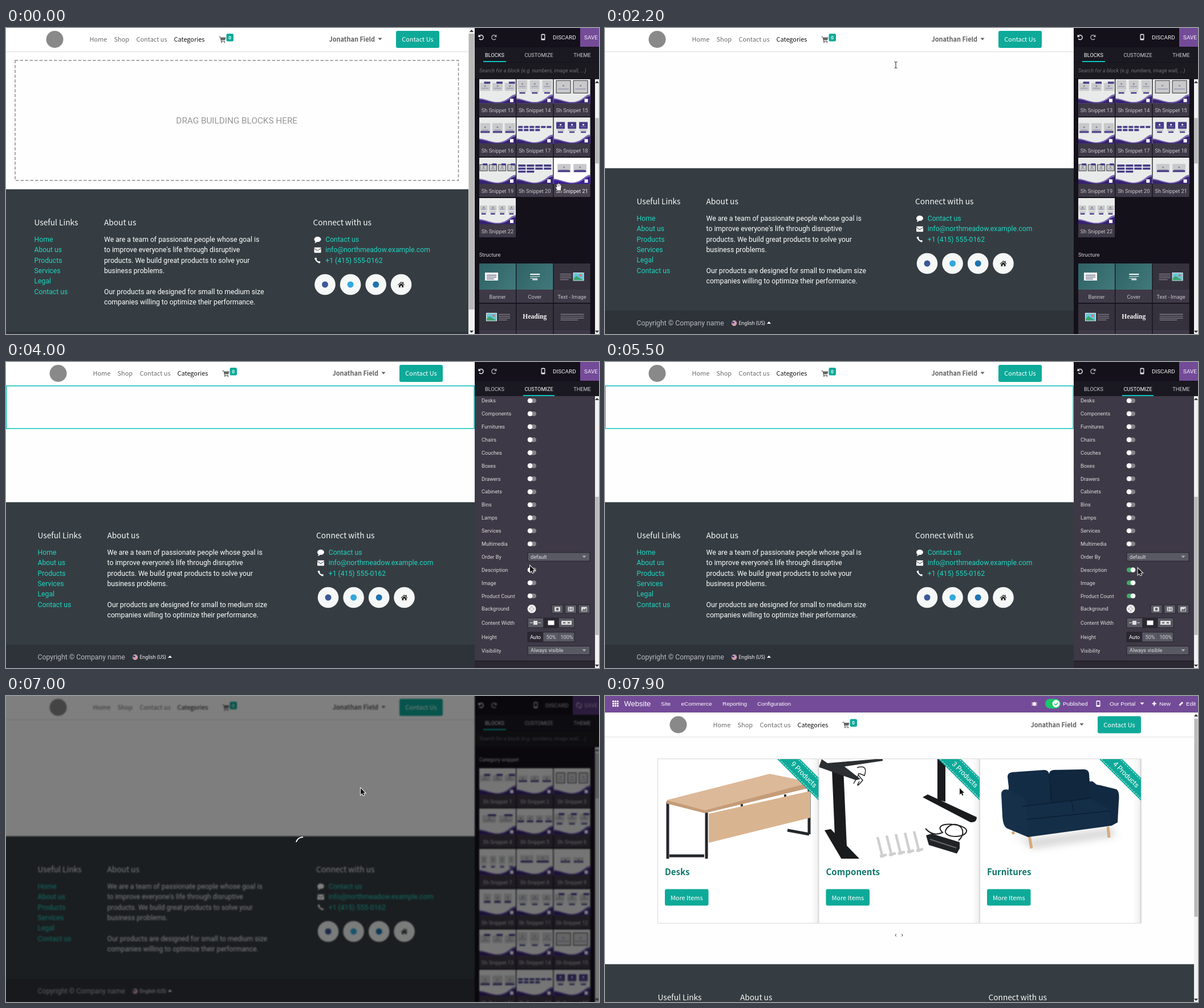
An HTML page with a canvas that plays this animation: 1040x538 px, repeating every 8000 ms.

```html
<!DOCTYPE html>
<html lang="en">
<head>
<meta charset="utf-8">
<title>Website builder</title>
<style>
html, body { margin: 0; width: 100%; height: 100%; overflow: hidden; background: #fefefe; }
canvas { display: block; }
</style>
</head>
<body>
<canvas width="1040" height="538"></canvas>
<script>
const canvas = document.querySelector('canvas'), g = canvas.getContext('2d');
const ROBOTO = 'Roboto, sans-serif';
const SOURCE = '"Noto Sans CJK JP", "Noto Sans CJK SC", "Noto Sans CJK", sans-serif';
const ARIAL = '"Liberation Sans", sans-serif';
const TEAL = '#0eaa99', LINK = '#1fd5c1', ACCENT = '#0bc4be', PURPLE = '#744b98', INK = '#453b87';
const PANEL = '#3e3946', DARK = '#14111b', LOOP = 8000;

function text(s, x, y, color, size = 12.235, font = ROBOTO, align = 'left', style = '') {
  g.font = `${style} ${size}px ${font}`;
  g.textAlign = align;
  g.fillStyle = color;
  g.fillText(s, x, y);
}
function box(x, y, w, h, color, r = 0) {
  g.fillStyle = color;
  g.beginPath();
  g.roundRect(x, y, w, h, r);
  g.fill();
}
function frame(x, y, w, h, color, lw = 1) {
  g.strokeStyle = color;
  g.lineWidth = lw;
  g.strokeRect(x, y, w, h);
}
function disc(x, y, r, color) { box(x - r, y - r, 2 * r, 2 * r, color, r); }
function fill(d, color) { g.fillStyle = color; g.fill(new Path2D(d)); }
function line(d, color, w = 1) { g.strokeStyle = color; g.lineWidth = w; g.stroke(new Path2D(d)); }
function at(x, y, draw, angle = 0) {
  g.save();
  g.translate(x, y);
  g.rotate(angle);
  draw();
  g.restore();
}
function clip(x, y, w, h, draw) {
  g.save();
  g.beginPath();
  g.rect(x, y, w, h);
  g.clip();
  draw();
  g.restore();
}
function blurred(radius, draw) {
  g.filter = `blur(${radius}px)`;
  draw();
  g.filter = 'none';
}
function caret(x, y, color, up = false) {
  at(x, y, () => fill(up ? 'M-3.5 2H3.5L0-2Z' : 'M-3.5-2H3.5L0 2Z', color));
}
function scrollbar(x, y, w, h, top, size) {
  box(x, y, w, h, '#f1f1f1');
  box(x + .5, top, w - 1, size, '#b9b9b9');
  caret(x + w / 2, y + 5, '#333', true);
  caret(x + w / 2, y + h - 4, '#333');
}
function mobile(x, y, color, screen) {
  box(x - 3.5, y - 5.5, 7, 11, color, 1.5);
  box(x - 2.2, y - 3.7, 4.4, 6.3, screen);
}

// ---- website page ----
function header({w, hx, rx}) {
  box(0, 0, w, 41, '#fff');
  box(0, 41, w, 1, '#e2e2e2');
  box(0, 42, w, 1, '#f5f5f5');
  disc(hx + 36, 20, 15, '#8a8989');
  [['Home', 97], ['Shop', 140], ['Contact us', 179]].forEach(([s, x]) =>
    text(s, hx + x, 24, '#6c6c6c', 10.95, SOURCE));
  text('Categories', hx + 245, 24, '#151515', 10.95, SOURCE);
  at(hx + 324, 15, () => {
    fill('M0 0H2.6L3 1.5H12L10.6 6.5H4.2L4.5 8H10.5V9H3.6L2 1.2H0Z', '#666');
    disc(4.6, 10, 1.1, '#666');
    disc(9.8, 10, 1.1, '#666');
  });
  box(hx + 337, 10, 12.5, 13.5, TEAL, 2.5);
  text('0', hx + 343.2, 19.8, '#fff', 8, SOURCE, 'center', 'bold');
  text('Jonathan Field', rx - 113, 24, '#606060', 10.95, SOURCE, 'right', 'bold');
  caret(rx - 104, 19.5, '#606060');
  box(rx - 76, 5, 76, 30, TEAL, 3);
  text('Contact Us', rx - 38, 24, '#fff', 10.95, SOURCE, 'center');
}

const NARROW = ['We are a team of passionate people whose goal is', "to improve everyone's life through disruptive",
  'products. We build great products to solve your', 'business problems.'];
const WIDE = ['We are a team of passionate people whose goal is to improve',
  "everyone's life through disruptive products. We build great", 'products to solve your business problems.'];
const CLOSING = ['', 'Our products are designed for small to medium size', 'companies willing to optimize their performance.'];

function footer({w, fy, cols: [a, b, c], wide}) {
  const list = (items, x, color) => items.forEach((s, i) => text(s, x, fy + 92 + i * 18.35, color));
  const bar = fy + (wide ? 232 : 250);
  box(0, fy - .5, w, 538, '#353d42');
  text('Useful Links', a, fy + 63, '#f8f8f8', 13.7, SOURCE);
  text('About us', b, fy + 63, '#f8f8f8', 13.7, SOURCE);
  text('Connect with us', c, fy + 63, '#f8f8f8', 13.7, SOURCE);
  list(['Home', 'About us', 'Products', 'Services', 'Legal', 'Contact us'], a, LINK);
  list([...(wide ? WIDE : NARROW), ...CLOSING], b, '#fff');
  list(['Contact us', 'info@northmeadow.example.com', '+1 (415) 555-0162'], c + 21.7, LINK);
  at(c + 8, fy + 88, () => {
    fill('M-6-.5A6 4.6 0 1 1 -1 4Q-3 6-5.5 6Q-4 4.5-4 3Q-6 2-6-.5Z', '#fff');
    box(-6, 13.7, 12, 9.5, '#fff', 1);
    line('M-6 15.5L0 19.5L6 15.5', '#353d42');
    line('M-3.5 32.5Q-3 39 3.8 40.5', '#fff', 2.3);
    line('M-4 32.2L-2.8 35M1.4 39.3L4.5 40.3', '#fff', 3.3);
  });
  ['#3b5998', '#33a8de', '#1d74b0'].forEach((color, i) => {
    disc(c + 21 + i * 44.6, fy + 167, 18.3, '#f6f8f8');
    disc(c + 21 + i * 44.6, fy + 167, 5.5, color);
  });
  disc(c + 154.5, fy + 167, 18.3, '#f6f8f8');
  at(c + 154.5, fy + 167, () => {
    fill('M-6 .5L0-5L2.5-2.7V-4.5H4V-1.3L6 .5L5.3 1.3L0-3.5L-5.3 1.3Z', '#222');
    fill('M-4 1.3L0-2.3L4 1.3V5H1.2V2H-1.2V5H-4Z', '#222');
  });
  box(0, bar, w, 60, '#2e333a');
  text('Copyright © Company name', a, bar + 26, '#b9bbbe');
  at(a + 171, bar + 22, () => {
    disc(0, 0, 4.6, '#eee');
    for (let y = -3; y < 4; y += 2.4) box(-4.2, y, 8.4, 1.1, '#c8324a');
    box(-4, -3, 4, 3.5, '#394a8c');
  });
  text('English (US)', a + 179, bar + 25, '#fff', 8.3, '"Noto Sans", sans-serif');
  caret(a + 232, bar + 21, '#fff', true);
}

function page(p) {
  box(0, 0, p.w, 538, '#fefefe');
  footer(p);
  at(0, p.top || 0, () => header(p));
}

const HINT = {w: 811, hx: 49.5, rx: 760, fy: 284, cols: [49.5, 172, 538.5]};
const EDIT = {w: 822, hx: 55.5, rx: 766, fy: 247, cols: [55.5, 177.5, 544]};
const SLIDE = {w: 1001, hx: 145.5, rx: 855.5, fy: 265, cols: [76.5, 221.5, 657], wide: true};
const VIEW = {w: 1033, hx: 92.5, rx: 940, fy: 265, cols: [92.5, 237, 672.5], wide: true};

function dropZone() {
  g.setLineDash([5.5, 3]);
  frame(16, 57, 777.5, 211, '#8d8d8d', 1.5);
  g.setLineDash([]);
  text('DRAG BUILDING BLOCKS HERE', 404.7, 168, '#969696', 15.3, ROBOTO, 'center');
  scrollbar(811, 0, 11, 538, 10, 485);
}
function blockTools() {
  box(390, 21, 42, 21, DARK, 2);
  line('M397 28V35M394 31.5H400M408 28H414V35H408Z', '#ddd');
  box(422, 28, 6, 8, '#e6586c', 1);
}

// ---- editor sidebar ----
// [count, width, top, height, style]: c caption, o outline, p purple, b band, t chip
const MINI = [
  [3, 18, 12, 11, 't'], [3, 16, 13, 12, 'b'], [3, 15, 8, 18, 'o'], [2, 24, 12, 13, 't'],
  [4, 13, 12, 13, 'b'], [3, 17, 10, 11, 'ct'], [4, 11, 12, 14, 'c'], [2, 23, 11, 14, 'b'],
  [2, 18, 15, 10, 'b'], [3, 13, 8, 17, 'b'], [3, 16, 9, 12, 'c'], [3, 17, 9, 12, 'ct'],
  [3, 18, 10, 14, 't'], [3, 17, 5, 17, 'c'], [2, 25, 6, 22, 'o'], [3, 18, 10, 18, 'b'],
  [6, 4], [3, 15, 8, 12, 'pc'], [4, 13, 12, 11, 'ot'], [4, 4, 2], [2, 23, 11, 15, 'b'], [4, 13, 13, 9, 'c']];

function mini([n, w, top, h, style]) {
  if (!style) {
    const rows = [n, w, top || 0], step = 60 / n;
    rows.forEach((k, r) => {
      for (let i = 0; i < k; i++) box(3 + i * step, (n > 5 ? 15 : 12) + r * 5.3, step - 2, 3.6, INK, .5);
    });
    return;
  }
  const step = Math.min(63 / n + w * .04, w + 5), has = s => style.includes(s);
  for (let i = 0; i < n; i++) {
    const x = 32 + (i - (n - 1) / 2) * step - w / 2;
    box(x, top, w, h, has('p') ? INK : '#c9c9cb', 1);
    if (has('o')) frame(x, top, w, h, '#333', 1);
    if (has('b')) box(x + 1, top + h - 4, w - 2, 3, INK);
    if (has('t')) box(x + w * .4, top - 2, w * .6, 3.5, INK);
    if (has('c')) {
      box(x + 1, top + h + 2, w - 2, 1, '#999');
      box(x + w * .2, top + h + 4.5, w * .6, 2.5, INK);
    }
    disc(x + w / 2, top + h * .4, 1.5, has('p') ? '#fff' : '#8b8994');
    box(x + 3, top + h * .65, w - 6, 1, '#8580a5');
  }
}
function thumb(i, hover) {
  box(0, 0, 64, 46, hover ? '#fff' : '#e9ebea');
  fill('M0 37C14 38 24 46 38 43S54 31 64 30V46H0Z', '#7b69b0');
  fill('M0 39C12 40 22 46 36 45S54 35 64 33V46H0Z', hover ? '#3c1f96' : '#37236f');
  box(54, 38, 6, 6, '#fff');
  mini(MINI[i - 1]);
}
function label(s, hover) {
  box(0, 46, 64, 23, hover ? '#48434f' : PANEL);
  text(s, 32, 62, hover ? '#eee' : '#c8c6ca', 9.18, ROBOTO, 'center');
}
function lines(x, y, n, w, color = '#8a8690') {
  for (let i = 0; i < n; i++) box(x, y + i * 3.3, i === n - 1 ? w * .75 : w, 1.2, color);
}
function picture(x) {
  box(x, 16, 19, 14.5, '#e8f3f5');
  box(x + 1, 17, 17, 12.5, '#68c5d8');
  disc(x + 13, 21, 2, '#f4685b');
  fill(`M${x + 1} 29.5V26L${x + 6} 22L${x + 18} 29.5Z`, '#3ea36f');
}
const STRUCTURE = [
  ['Banner', () => { box(10, 16, 23, 14, '#f4f5f5'); lines(13, 20, 3, 17, '#557'); }],
  ['Cover', () => { box(24, 18, 17, 2, '#fff'); lines(24, 22, 2, 17, '#cfdcdc'); box(28, 27, 9, 2.5, '#dde'); }],
  ['Text - Image', () => { lines(11, 18, 4, 20); picture(34); }],
  ['', () => { picture(12); lines(34, 18, 4, 20); }],
  ['', () => text('Heading', 32, 26, '#f4f4f4', 11.6, '"Liberation Serif", serif', 'center', 'bold')],
  ['', () => lines(12, 18, 4, 41)]];

function blocks(scroll, hover) {
  box(822, 61, 218, 28, '#1c1a21');
  text('Search for a block (e.g. numbers, image wall, ...)', 830, 78, '#716d78', 9.1, ROBOTO, 'left', 'italic');
  clip(822, 90, 211, 448, () => at(0, -scroll, () => {
    const cell = (k, top, draw) => at(830 + k % 3 * 65.3, top + Math.floor(k / 3) * 70.85, draw);
    text('Category snippet', 830, 115, '#d5d3d8', 9.18);
    for (let i = 1; i <= 22; i++) cell(i - 1, 127, () => {
      thumb(i, i === hover);
      label('Sh Snippet ' + i, i === hover);
    });
    text('Structure', 830, 726, '#d5d3d8', 9.18);
    STRUCTURE.forEach(([name, draw], k) => cell(k, 738, () => {
      const shade = g.createLinearGradient(0, 0, 64, 46);
      shade.addColorStop(0, '#2f6265');
      shade.addColorStop(1, '#41797a');
      box(0, 0, 64, 46, k < 2 ? shade : '#36323d');
      label(name);
      draw();
    }));
  }));
  scrollbar(1033, 90, 7, 448, 100 + scroll * .18, 80);
}

const OPTIONS = ['Desks', 'Components', 'Furnitures', 'Chairs', 'Couches', 'Boxes', 'Drawers', 'Cabinets', 'Bins',
  'Lamps', 'Services', 'Multimedia', 'Order By', 'Description', 'Image', 'Product Count'];

function toggle(y, on) {
  box(915, y - 4, 15, 8, on ? '#40ad67' : '#85838a', 4);
  disc(on ? 926 : 919, y, 4.3, '#fff');
}
function select(s, y) {
  box(915, y - 7.5, 109, 15, '#595964', 1.5);
  frame(915, y - 7.5, 109, 15, '#25222b');
  text(s, 920, y + 3.3, '#d9d9d9', 9.18);
  caret(1014, y, '#aaa');
}
function group(y, active, names) {
  names.forEach((s, i) => {
    box(915 + i * 27.5, y - 8.5, 27, 17, i === active ? '#2b2831' : '#595964');
    text(s, 928.5 + i * 27.5, y + 3.3, i === active ? '#fff' : '#d0d0d4', 9.18, ROBOTO, 'center');
  });
  frame(915, y - 8.5, 82, 17, '#25222b');
}
function customize(t) {
  const shift = t < 3200 ? 328 : 0, on = {Description: 4300, Image: 4900, 'Product Count': 5300};
  box(822, 60, 218, 478, PANEL);
  clip(822, 60, 211, 478, () => at(0, shift, () => {
    box(822, -268, 211, 24, '#2b2833');
    text('Block', 830, -252, '#fff', 9.95);
    OPTIONS.forEach((s, i) => {
      const y = 68 + i * 22.88;
      text(s, 834, y + 3.3, '#d9d9d9', 9.18);
      if (s === 'Order By') select('default', y);
      else toggle(y, t >= on[s]);
    });
    ['Background', 'Content Width', 'Height', 'Visibility'].forEach((s, i) =>
      text(s, 834, [437.3, 461.5, 486.7, 510.5][i], '#d9d9d9', 9.18));
    disc(922, 434, 7.5, '#f2f2f2');
    for (let i = 0; i < 9; i++) if (i % 2) box(917 + i % 3 * 3.3, 429 + Math.floor(i / 3) * 3.3, 3.3, 3.3, '#c9c9c9');
    for (let i = 0; i < 3; i++) {
      box(957 + i * 23.5, 427, 20, 15, '#595964', 1);
      frame(957 + i * 23.5, 427, 20, 15, '#25222b');
      box(962 + i * 23.5, 430.5, 10, 8, '#d9d9d9', 1);
    }
    disc(967, 434.5, 2.3, '#595964');
    line('M988 431V438M993 431V438M988 434.5H993', '#595964');
    fill('M1010 437.5L1013 434L1015 435.5L1018 432V437.5Z', '#595964');
    group(458.5, 1, ['', '', '']);
    box(925, 455, 7, 7, '#ddd');
    line('M919 458.5H924M933 458.5H938', '#ddd');
    box(950.5, 454.5, 11, 8, '#fff');
    box(974, 455, 18, 7, '#ddd');
    line('M977 458.5H981M985 458.5H989', '#595964', 2);
    group(483.5, 0, ['Auto', '50%', '100%']);
    select('Always visible', 507);
    box(822, 526, 211, 12, '#2b2833');
    box(822, 525, 211, 1, '#1a181f');
  }));
  scrollbar(1033, 60, 7, 478, shift ? 70 : 237, 243);
}

function sidebar(t, hover) {
  const custom = t >= 2500 && t < 6400, saving = t >= 6300, back = saving ? 13 : 0;
  box(822, 0, 218, 538, DARK);
  box(822, 34, 218, 26, '#1a1820');
  [833, 856].forEach((x, i) => at(x, 16.5, () => {
    if (i) g.scale(-1, 1);
    line('M-3-2.5A4 4 0 1 1 -3 2.5', i ? '#aaa' : '#eee', 1.4);
    fill('M-4.5-5V-.5H0Z', i ? '#aaa' : '#eee');
  }));
  mobile(942 - back, 16, saving ? '#b5b4b8' : '#e6e6e6', DARK);
  text('DISCARD', 959 - back, 20, saving ? '#c4c3c6' : '#f2f2f2', 9.95);
  box(1007 - back, 0, 60, 33, saving ? '#57397a' : PURPLE);
  text('SAVE', 1014, 20, saving ? '#b9a9cb' : '#f5f0fa', 9.95);
  if (saving) at(1005, 16.5, () => {
    line('M-4-1A4 4 0 0 1 3-3M4 1A4 4 0 0 1 -3 3', '#b9a9cb', 1.4);
    fill('M4.5-5V-1H.5ZM-4.5 5V1H-.5Z', '#b9a9cb');
  }, (t - 6400) / 1000 * Math.PI);
  [['BLOCKS', 857], ['CUSTOMIZE', 934.5], ['THEME', 1010.5]].forEach(([s, x], i) =>
    text(s, x, 50.5, i === +custom ? '#fff' : '#cfcdd2', 9.18, ROBOTO, 'center'));
  if (custom) box(907, 58, 55, 2, ACCENT); else box(837, 58, 40, 2, ACCENT);
  if (custom) customize(t);
  else blocks(t < 6700 ? 324 : 0, hover);
}

// ---- published view ----
function navbar() {
  box(0, 0, 1040, 29, PURPLE);
  for (let i = 0; i < 9; i++) box(13 + i % 3 * 3.9, 8 + Math.floor(i / 3) * 3.9, 2.9, 2.9, '#fff');
  text('Website', 33.5, 18, '#fff', 13, ARIAL);
  [['Site', 98], ['eCommerce', 133.5], ['Reporting', 206], ['Configuration', 267], ['Published', 803],
    ['Our Portal', 885], ['New', 972], ['Edit', 1019]].forEach(([s, x]) => text(s, x, 17, '#fff', 9.95, ARIAL));
  box(750.5, 10.5, 5, 7, '#fff', 2.5);
  line('M748.5 11L757.5 17M748.5 17L757.5 11M748 14H758', '#fff');
  box(772, 5, 27, 17, '#1dc56b', 8.5);
  disc(791, 13.5, 6.5, '#fff');
  line('M788 13.5L790.5 16L794.5 11.5', '#1dc56b', 1.5);
  mobile(865, 13.5, '#fff', PURPLE);
  caret(942, 13.5, '#fff');
  line('M959.5 13.5H967M963.2 9.7V17.3', '#fff', 2);
  line('M1007.5 16.5L1013 11', '#fff', 3);
  scrollbar(1033, 29, 7, 509, 40, 348);
}
function desk() {
  line('M110 186V287M178 205V287M113 281H174M358 162V243M320 236L358 243', '#24272a', 5);
  fill('M108 184L289 137L361 152V161L175 206L108 189Z', '#c59c78');
  fill('M108 183L289 137L361 152L175 201Z', '#dcb999');
  line('M240 190L240 198M316 173V180', '#333', 4);
  fill('M182 207L360 167V214L182 258Z', '#d9b490');
}
function deskFrame() {
  fill('M398 128L418 126L424 264L403 246ZM385 236L396 234L447 287H415Z', '#191b1d');
  fill('M583 111H597V186L583 182ZM557 178L566 173L652 213Q652 223 641 222Z', '#191b1d');
  fill('M380 111L390 118L487 110V114L420 124L448 146L440 148L375 125Z', '#2c2f31');
  line('M442 126Q462 120 455 140Q435 130 452 148Q438 165 446 150M436 154L445 138', '#222', 1.5);
  for (let i = 0; i < 5; i++) line(`M${478 + i * 16} ${248 - i * 2.5}l9 36m-5-2l12 -3`, '#cfcfcf', 4.5);
  fill('M563 245L573 242L622 257V268L617 277L568 262Z', '#202326');
  line('M570 252L616 267', '#666', 2);
  line('M562 233Q575 248 592 240C570 218 637 224 634 238S585 249 600 232S640 236 620 254', '#222', 2);
}
function sofa() {
  blurred(7, () => fill('M715 240L742 252L890 232L895 246L750 268Z', '#d4d4d4'));
  line('M744 245L748 268M882 230L884 249M715 238L717 243', '#d6ac7b', 5);
  fill('M708 160L855 150L899 185L899 222L888 228L742 248L704 232Z', '#122a41');
  fill('M706 142Q706 135 714 134L770 130Q778 130 779 138L783 190L712 195Z', '#132c45');
  fill('M779 137Q779 131 787 130L840 129Q848 129 849 137L852 182L783 188Z', '#10273d');
  fill('M728 194L850 180L886 200L888 226L742 247Z', '#142e48');
  fill('M695 172Q696 162 708 165L735 180Q742 186 742 248L704 232Q698 228 697 212Z', '#163049');
  fill('M850 160Q856 154 869 157L897 164Q903 168 901 186L899 222L888 228L885 190Q884 182 850 172Z', '#122a41');
  line('M732 194L818 184L850 180M818 184L822 204M740 217L886 202M779 137L783 188', '#0a1929', 1);
}
const CARDS = [['Desks', 9, desk], ['Components', 3, deskFrame], ['Furnitures', 4, sofa]];

function cards(withImages) {
  CARDS.forEach(([name, count, draw], i) => {
    const x = 92.5 + i * 282.5;
    box(x, 110.5, 282.5, 289, '#fff');
    if (withImages) clip(x, 111, 282, 175, draw);
    for (let k = 0; k < 12; k++) box(x + 282 - k, 111, 1, 288, `rgba(0,0,0,${.24 / (k + 1)})`);
    frame(x, 110.5, 282.5, 289, '#d9d9d9');
    clip(x, 111, 282.5, 100, () => at(x + 256.5, 138, () => {
      box(-80, -14.2, 160, 28.4, TEAL);
      g.setLineDash([3, 2]);
      line('M-80-11.8H80M-80 11.8H80', '#d8f5f1', 1);
      g.setLineDash([]);
      text(count + ' Products', 0, 4.3, '#fff', 12.235, ROBOTO, 'center');
    }, Math.PI / 4));
    text(name, x + 12.5, 315, '#0d766a', 15.05, SOURCE, 'left', 'bold');
    box(x + 12.5, 339.5, 76.5, 29, TEAL, 3);
    text('More Items', x + 50.7, 358.5, '#fff', 10.95, SOURCE, 'center');
  });
  text('‹', 510, 424, '#222', 12, SOURCE, 'center');
  text('›', 521, 424, '#222', 12, SOURCE, 'center');
}

// ---- pointer ----
const PATH = [[500, 969, 279], [900, 990, 192], [1200, 990, 192], [1800, 516, 72], [1900, 513, 69], [2100, 513, 69],
  [2200, 510, 65], [2700, 510, 65], [3000, 904, 252], [3300, 904, 252], [3400, 906, 252], [3500, 906, 252],
  [3700, 912, 339], [3900, 912, 339], [4000, 919, 358], [4100, 919, 358], [4300, 919, 361], [4500, 919, 361],
  [4900, 924, 384], [5000, 924, 384], [5300, 921, 412], [5400, 921, 412], [6200, 1029, 15], [6500, 1029, 15],
  [6900, 622, 162]];

function pointerAt(t) {
  const i = PATH.findIndex(p => p[0] > t);
  if (i < 0) return PATH.at(-1).slice(1);
  if (!i) return PATH[0].slice(1);
  const [t0, x0, y0] = PATH[i - 1], [t1, x1, y1] = PATH[i], k = (t - t0) / (t1 - t0);
  return [x0 + (x1 - x0) * k, y0 + (y1 - y0) * k];
}
function pointer(t, x, y) {
  at(x, y, () => {
    if (t < 2200) {
      const hand = 'M-2 7L-5.5 1Q-5-1-3 1L-4-4Q-2.5-6-1.7-4L-1-6Q.5-7 1-5L2-5.5Q3.5-5.5 3.5-3.5Q5.5-4 5.3-1L4.5 4V7Z';
      fill(hand, '#fff');
      line(hand, '#222', .9);
      line('M-1.7-4L-1-.5M1-5V-.5M3.5-3.5L3-.3', '#444', .7);
    } else if (t < 2800) {
      line('M-2.5-5.5Q0-5.5 0-4V4Q0 5.5-2.5 5.5M2.5-5.5Q0-5.5 0-4M0 4Q0 5.5 2.5 5.5', '#222');
    } else {
      const arrow = 'M0 0V11.5L2.7 9L4.5 13L6.4 12.2L4.6 8.3H8.2Z';
      line(arrow, '#fff', 1.8);
      fill(arrow, '#111');
    }
  });
}

function dim(t) {
  blurred(1, () => g.drawImage(canvas, 0, 0));
  box(0, 0, 1040, 538, 'rgba(0,0,0,.5)');
  at(521, 261, () => line('M-12.2-4.4A13 13 0 0 1 0-13', '#fff', 2), (t - 7000) / 1000 * 2 * Math.PI);
}

function editor(t, x, y) {
  page(t < 1800 ? HINT : EDIT);
  if (t < 1800) dropZone();
  if (t >= 2400 && t < 6400) frame(.5, 42, 820.5, 75, ACCENT, 1.5);
  if ((t >= 2400 && t < 2900) || (t >= 5600 && t < 6400)) blockTools();
  sidebar(t, t >= 1400 ? 0 : y > 228 ? 21 : 18);
  if (t >= 1300 && t < 1800) at(x - 32, y - 23, () => thumb(18, true));
  if (t >= 6600 && t < 7200) dim(t);
}
function published(t) {
  const loaded = t >= 7700;
  page({...VIEW, top: t < 7500 ? 0 : 30.5, fy: loaded ? 472 : 265});
  if (t < 7500) box(1033, 0, 7, 538, '#f1f1f1');
  else navbar();
  if (t >= 7800) cards(t >= 7900);
}

function render(now) {
  const t = Math.floor(now % LOOP / 100) * 100, [x, y] = pointerAt(t);
  g.fillStyle = '#fefefe';
  g.fillRect(0, 0, 1040, 538);
  if (t < 7300) editor(t, x, y);
  else if (t < 7400) {
    page(SLIDE);
    box(1001, 0, 7, 538, '#f1f1f1');
    at(186, 0, () => sidebar(t, 0));
  } else published(t);
  pointer(t, x, y);
}

const start = performance.now();
function tick() {
  render(performance.now() - start);
  requestAnimationFrame(tick);
}
tick();
</script>
</body>
</html>
```
